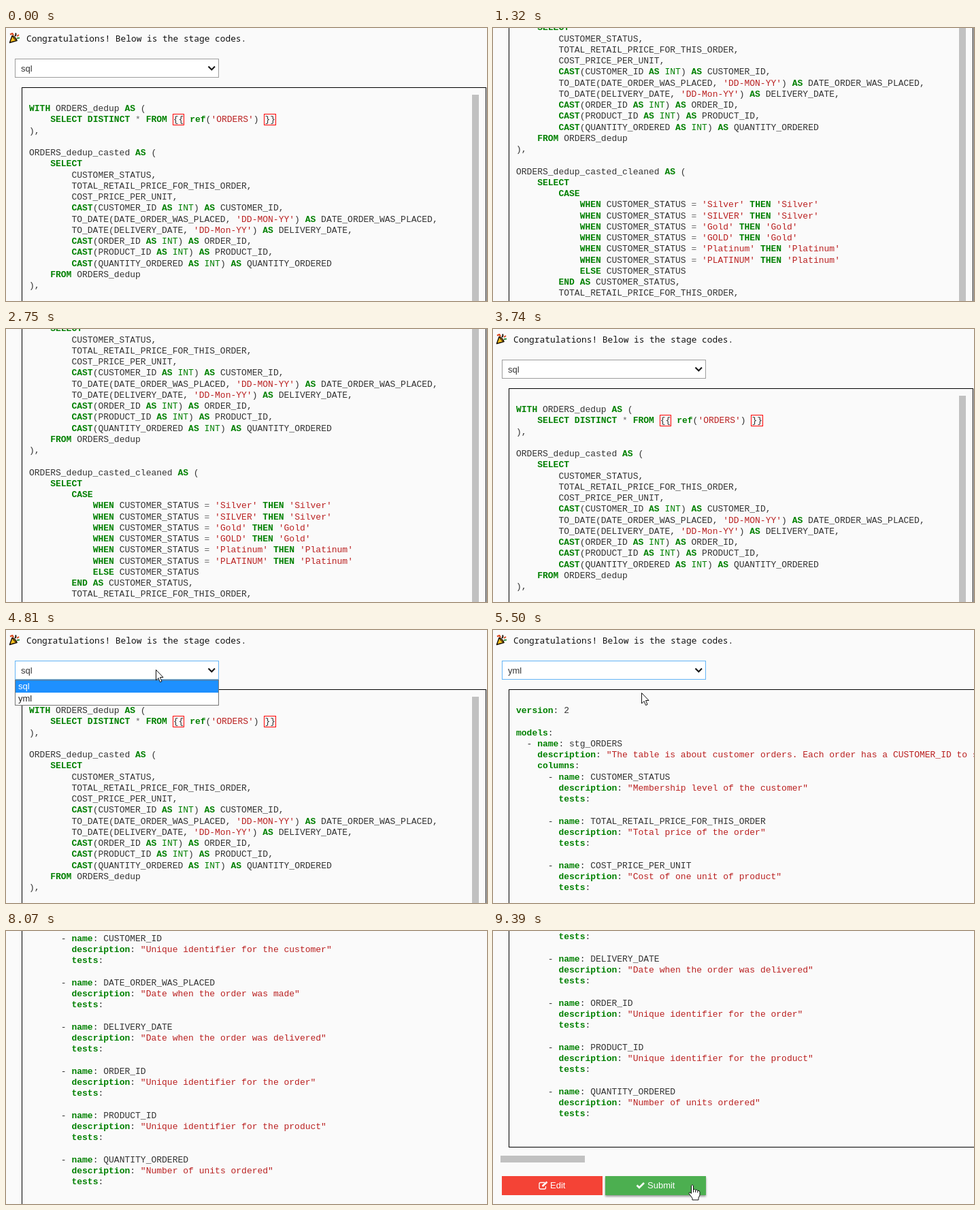
Animation of 707 by 401 pixels, one loop 9510 ms. Source, as an HTML page:

```html
<!DOCTYPE html>
<html lang="en">
<head>
<meta charset="utf-8">
<title>Stage codes</title>
<style>
html, body { margin: 0; width: 100%; height: 100%; overflow: hidden; background: #fafafa; }
#stage { position: relative; width: 100%; height: 100%; overflow: clip; contain: strict; }
#page, #page > svg, #overlay { position: absolute; left: 0; top: 0; }
pre {
  position: absolute; left: 34px; top: 111px; margin: 0; color: #333;
  font: 13px/16.25px "Liberation Mono", monospace;
}
pre b { color: #008000; }
pre i { color: #008000; font-style: normal; }
pre s { color: #ba2121; text-decoration: none; }
pre u { color: #666; text-decoration: none; }
pre em { border: 1px solid #f00; font-style: normal; }
text { font: 13px "Liberation Sans", Arial, sans-serif; }
text.title { font: 12.83px "Noto Sans Mono", monospace; }
.hover { filter: drop-shadow(0 2px 1.5px rgba(0, 0, 0, .4)); }
</style>
</head>
<body>
<div id="stage">
<div id="page">
  <svg width="707" height="920">
    <g stroke="#1c1408" stroke-linejoin="round">
      <path d="M5.5 21.5 L9 11.5 Q14 13 16 18.5 Z" fill="#fcc21b" stroke-width="1.5"/>
      <path d="M9 11.5 Q14 13 16 18.5 Q11.5 17 9 11.5Z" fill="#b97a10"/>
      <path d="M6 9.5 L9.5 8 L11 11" fill="none" stroke="#d8471c" stroke-width="2"/>
      <path d="M13 12 Q15.5 10 14 7.5" fill="none" stroke-width="1.8"/>
      <path d="M16 15 L20 14.5" fill="none" stroke="#2e8b3d" stroke-width="2"/>
      <path d="M16 12 L19 10" fill="none" stroke="#d8471c" stroke-width="2"/>
    </g>
    <text class="title" x="30" y="20" fill="#111">Congratulations! Below is the stage codes.</text>
    <rect id="select" x="13.5" y="45.5" width="299" height="27" fill="#fff"/>
    <text id="value" x="22" y="64" fill="#333"></text>
    <path d="M297.5 56.5 L302.3 61.3 L307 56.5" fill="none" stroke="#111" stroke-width="2"/>
    <rect id="box" x="23.5" y="87.5" fill="none" stroke="#000"/>
    <rect id="vbar" x="685" y="98" width="10" height="520" fill="#c1c1c1"/>
    <rect id="hbar" x="11" y="830" width="124" height="10" fill="#c1c1c1"/>
    <g id="buttons">
      <rect x="13" width="148" height="28" fill="#f44336"/>
      <rect id="submit" x="165" width="148" height="28" fill="#4caf50"/>
      <g fill="none" stroke="#fff">
        <path d="M76 9.5 H70 Q68 9.5 68 11.5 V17 Q68 19 70 19 H75.5 Q77.5 19 77.5 17 V15" stroke-width="1.3"/>
        <path d="M72.5 15 L79.5 8.5" stroke-width="2.6"/>
        <path d="M211.5 13.5 L215 17 L222 10" stroke-width="2.6"/>
      </g>
      <text x="84" y="18" fill="#fff">Edit</text>
      <text x="227" y="18" fill="#fff">Submit</text>
    </g>
  </svg>
  <pre id="code"></pre>
</div>
<svg id="overlay" width="707" height="401">
  <g id="list">
    <rect x="13.5" y="73.5" width="299" height="37" fill="#fff" stroke="#767676"/>
    <rect id="mark" x="14" width="298" height="18" fill="#1e90ff"/>
    <text id="opt0" x="18" y="87">sql</text>
    <text id="opt1" x="18" y="105">yml</text>
  </g>
  <g id="cursor" fill="#fff" stroke="#111" stroke-linejoin="round">
    <path id="arrow" d="M.5 .5 V16 L4 12.5 L6.5 18.5 L9 17.5 L6.5 11.5 H11 Z"/>
    <path id="hand" d="M-1.5 2 Q0 -.5 1.5 2 V8 Q3.5 6.5 4.7 8.5 Q6.7 7.3 7.8 9.3 Q10.5 8.5 11 11.5
      V16 L9 20 V23 H0 V20.5 L-5 13.5 Q-5 10.5 -1.5 13.5 Z M1.5 8 V12 M4.7 9 V12 M7.8 9.5 V12.5"/>
  </g>
</svg>
</div>
<script>
const $ = id => document.getElementById(id);
const LOOP = 9510;

const whens = [["Silver", "Silver"], ["SILVER", "Silver"], ["Gold", "Gold"], ["GOLD", "Gold"],
  ["Platinum", "Platinum"], ["PLATINUM", "Platinum"]]
  .map(([a, b]) => `            WHEN CUSTOMER_STATUS = '${a}' THEN '${b}'`).join("\n");

const sql = `WITH ORDERS_dedup AS (
    SELECT DISTINCT * FROM {{ ref('ORDERS') }}
),

ORDERS_dedup_casted AS (
    SELECT
        CUSTOMER_STATUS,
        TOTAL_RETAIL_PRICE_FOR_THIS_ORDER,
        COST_PRICE_PER_UNIT,
        CAST(CUSTOMER_ID AS INT) AS CUSTOMER_ID,
        TO_DATE(DATE_ORDER_WAS_PLACED, 'DD-MON-YY') AS DATE_ORDER_WAS_PLACED,
        TO_DATE(DELIVERY_DATE, 'DD-Mon-YY') AS DELIVERY_DATE,
        CAST(ORDER_ID AS INT) AS ORDER_ID,
        CAST(PRODUCT_ID AS INT) AS PRODUCT_ID,
        CAST(QUANTITY_ORDERED AS INT) AS QUANTITY_ORDERED
    FROM ORDERS_dedup
),

ORDERS_dedup_casted_cleaned AS (
    SELECT
        CASE
${whens}
            ELSE CUSTOMER_STATUS
        END AS CUSTOMER_STATUS,
        TOTAL_RETAIL_PRICE_FOR_THIS_ORDER,
        COST_PRICE_PER_UNIT,
        CUSTOMER_ID,
        DATE_ORDER_WAS_PLACED,
        DELIVERY_DATE,
        ORDER_ID,
        PRODUCT_ID,`;

const yml = `version: 2

models:
  - name: stg_ORDERS
    description: "The table is about customer orders. Each order has a CUSTOMER_ID to show who placed it"
    columns:
` + [
  ["CUSTOMER_STATUS", "Membership level of the customer"],
  ["TOTAL_RETAIL_PRICE_FOR_THIS_ORDER", "Total price of the order"],
  ["COST_PRICE_PER_UNIT", "Cost of one unit of product"],
  ["CUSTOMER_ID", "Unique identifier for the customer"],
  ["DATE_ORDER_WAS_PLACED", "Date when the order was made"],
  ["DELIVERY_DATE", "Date when the order was delivered"],
  ["ORDER_ID", "Unique identifier for the order"],
  ["PRODUCT_ID", "Unique identifier for the product"],
  ["QUANTITY_ORDERED", "Number of units ordered"]
].map(([name, text]) =>
  `      - name: ${name}\n        description: "${text}"\n        tests:\n`).join("\n");

// Wrap each match in the tag that belongs to its capture group.
const paint = (text, regex, tags) => text.replace(regex, (m, ...groups) => {
  const tag = tags[tags.findIndex((_, i) => groups[i])];
  return `<${tag}>${m}</${tag}>`;
});
const html = {
  sql: paint(sql,
    /('[^'\n]*')|(\{\{|\}\})|\b(INT)\b|\b(WITH|AS|SELECT|DISTINCT|FROM|ref|CAST|CASE|WHEN|THEN|ELSE|END)\b|([*=])/g,
    ["s", "em", "i", "b", "u"]),
  yml: paint(yml, /(".*")|(\w+)(?=:)/g, ["s", "b"])
};

// Held keyframes: [time, values...]
const scrolls = [[0, 0], [1170, 100], [1320, 200], [1590, 300], [2120, 350], [2500, 300], [2750, 200],
  [3180, 100], [3460, 50], [3740, 0], [6900, 100], [7210, 200], [7360, 250], [7790, 300],
  [8070, 400], [8490, 450], [8610, 500]];
const moves = [[0], [3990, 640, 330], [4120, 540, 250], [4260, 430, 175], [4390, 330, 115], [4530, 250, 75],
  [4660, 220, 58], [4950, 219, 78], [5080, 218, 92], [5650, 260, 140], [5780, 380, 215], [5900, 520, 300],
  [6030, 650, 370], [6160], [8910, 470, 195], [9030, 390, 245], [9150, 325, 298], [9270, 302, 345],
  [9390, 293, 372]];
const borders = [[0, "#9e9e9e"], [4810, "#64b5f6"], [6470, "#81aaca"], [6620, "#9e9e9e"]];
const at = (keys, t) => keys.findLast(k => k[0] <= t).slice(1);
const show = (id, on) => $(id).style.display = on ? "" : "none";

let shown;
function setCode(kind) {
  if (kind === shown) return;
  shown = kind;
  const isSql = kind === "sql";
  $("code").innerHTML = html[kind];
  $("box").setAttribute("width", isSql ? 682 : 900);
  $("box").setAttribute("height", isSql ? 621 : 730);
  $("buttons").setAttribute("transform", `translate(0 ${isSql ? 741 : 860})`);
  show("vbar", isSql);
  show("hbar", !isSql);
}

function draw(now) {
  const t = now % LOOP;
  setCode(t < 5500 ? "sql" : "yml");
  $("page").style.top = -at(scrolls, t)[0] + "px";
  $("value").textContent = t < 5350 ? "sql" : "yml";
  $("select").setAttribute("stroke", at(borders, t)[0]);

  const pick = t < 5080 ? 0 : 1;
  show("list", t >= 4810 && t < 5350);
  $("mark").setAttribute("y", 74 + 18 * pick);
  $("opt0").setAttribute("fill", pick ? "#222" : "#fff");
  $("opt1").setAttribute("fill", pick ? "#fff" : "#222");

  const [x, y] = at(moves, t);
  const onSubmit = t >= 9390;
  show("cursor", x !== undefined);
  if (x !== undefined) $("cursor").setAttribute("transform", `translate(${x} ${y})`);
  show("arrow", !onSubmit);
  show("hand", onSubmit);
  $("submit").setAttribute("class", onSubmit ? "hover" : "");
  requestAnimationFrame(() => draw(performance.now()));
}
draw(0);
</script>
</body>
</html>
```
